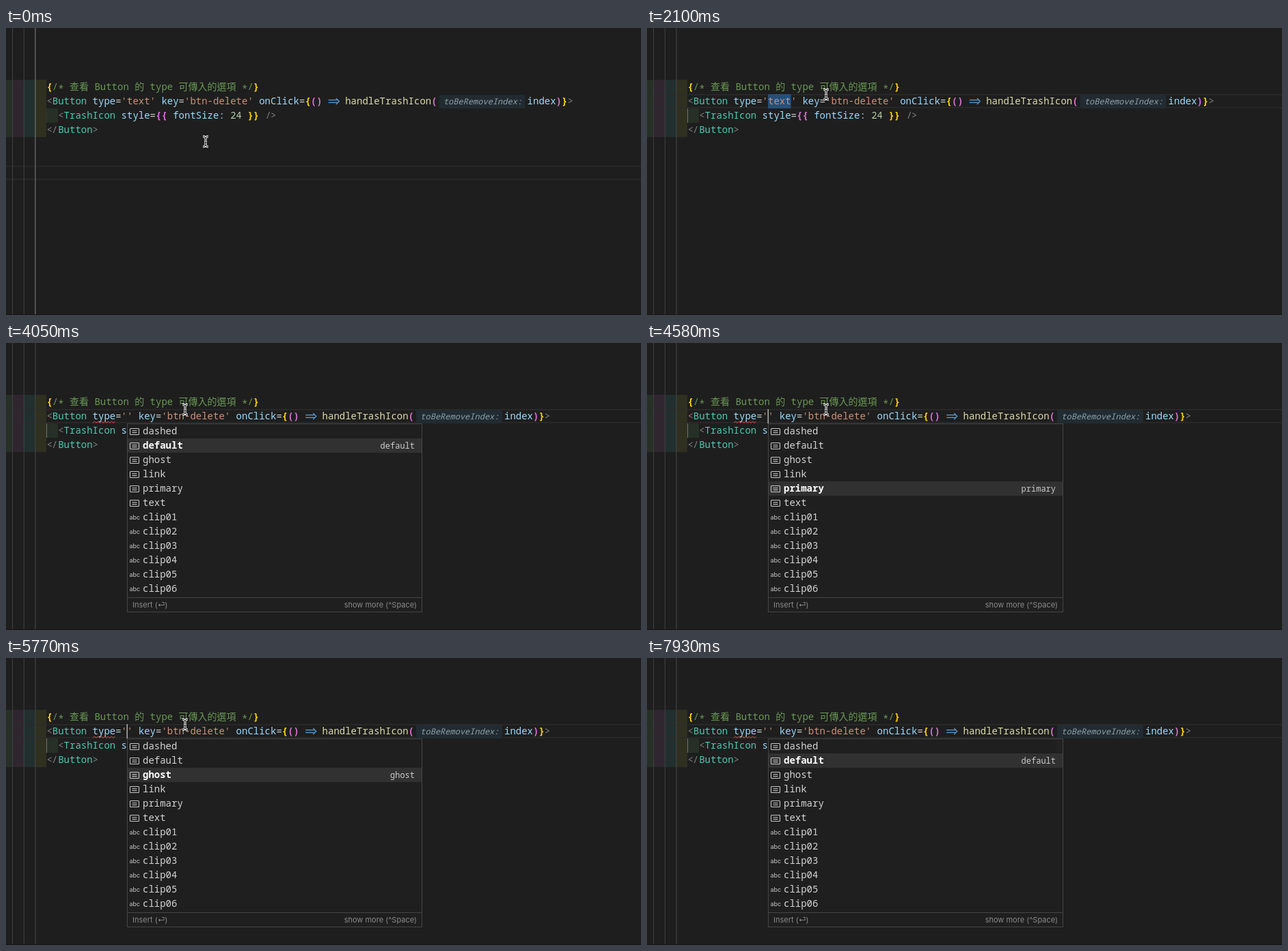
An HTML page with a canvas that plays this animation: 929x421 px, repeating every 8120 ms.

```html
<!DOCTYPE html>
<html lang="zh-Hant">
<head>
<meta charset="utf-8">
<style>
  html, body { margin: 0; width: 100%; height: 100%; overflow: hidden; background: #1e1e1e; }
  canvas { display: block; }
</style>
</head>
<body>
<canvas id="stage" width="929" height="421"></canvas>
<script>
const ctx = document.getElementById('stage').getContext('2d');
const LOOP = 8120, W = 929, H = 421;
const LEFT = 59.4, CHAR = 8.4, ROW = 21, TOP = 76, INDENT = 2 * CHAR;
const MONO = '"Noto Sans Mono", "Noto Sans CJK TC", "Noto Sans CJK JP", monospace';
const SANS = 'Inter, "DejaVu Sans", sans-serif';
const C = {
  bg: '#1e1e1e', tag: '#808080', type: '#4ec9b0', attr: '#9cdcfe', string: '#ce9178',
  number: '#b5cea8', call: '#dcdcaa', comment: '#6a9955', arrow: '#569cd6',
  gold: '#ffd700', pink: '#da70d6', plain: '#d4d4d4', guide: '#404040', active: '#707070'
};
const bands = ['127,255,127', '255,127,255', '79,236,236', '255,255,64'].map(c => `rgba(${c},.08)`);

const CLICK = 1410, SELECT = 1540, ERASE = 2450, SQUIGGLE = 3070, POPUP = 3280, LEAVE = 7400;
const items = ['dashed', 'default', 'ghost', 'link', 'primary', 'text',
  ...Array.from({ length: 6 }, (_, i) => 'clip0' + (i + 1))];
// [time, focused row]
const focusSteps = [[POPUP, 0], [4050, 1], [4230, 2], [4400, 3], [4520, 4], [5050, 5],
  [5410, 4], [5650, 3], [5770, 2], [5950, 1]];
// [time, caret shown]
const caretSteps = [[0, 0], [CLICK, 1], [2100, 0], [2510, 1], [3020, 0], [3460, 1], [3990, 0],
  [4460, 1], [4960, 0], [5470, 1], [6010, 0], [6470, 1], [6990, 0], [7400, 1], [7930, 0]];
// [time, x, y]
const pointerPath = [[0, 292, 166.5], [470, 292, 166.5], [1230, 195, 111], [1560, 195, 111],
  [1800, 262, 97.5], [6250, 262, 97.5], [6300, 268, 84], [6420, 261, 236], [6480, 259, 259],
  [6700, 262, 260], [7050, 280, 215], [7230, 280, 215], [7360, 689, 393], [LOOP, 689, 393]];

const clamp = v => Math.max(0, Math.min(1, v));
const valueAt = (steps, t) => steps.filter(s => s[0] <= t).pop()[1];

function pointerAt(t) {
  const i = pointerPath.findIndex(k => k[0] > t);
  const [t0, x0, y0] = pointerPath[i - 1], [t1, x1, y1] = pointerPath[i];
  const p = (t - t0) / (t1 - t0), e = p * p * (3 - 2 * p);
  return { x: x0 + (x1 - x0) * e, y: y0 + (y1 - y0) * e };
}

function rect(color, x, y, w, h) {
  ctx.fillStyle = color;
  ctx.fillRect(x, y, w, h);
}

function roundRect(x, y, w, h, r) {
  ctx.beginPath();
  ctx.roundRect(x, y, w, h, r);
}

function text(str, x, y, color, font, align = 'left') {
  ctx.font = font;
  ctx.fillStyle = color;
  ctx.textAlign = align;
  ctx.fillText(str, x, y);
}

function stroke(points, color, width) {
  ctx.beginPath();
  points.forEach(([x, y]) => ctx.lineTo(x, y));
  ctx.strokeStyle = color;
  ctx.lineWidth = width;
  ctx.stroke();
}

// Draws [color, text, shiftX, shiftY] parts one after another and returns the end position.
function run(x, y, parts) {
  for (const [color, str, dx = 0, dy = 0] of parts) {
    const weight = color === C.gold || color === C.pink ? 700 : 500;
    text(str, x + dx, y + dy, color, `${weight} 14px ${MONO}`);
    x += ctx.measureText(str).width;
  }
  return x;
}

function doubleArrow(x, y) {
  for (const dy of [-1.9, 1.9]) stroke([[x, y + dy], [x + 13.5, y + dy]], C.arrow, 1.3);
  stroke([[x + 11, y - 4.6], [x + 15.6, y], [x + 11, y + 4.6]], C.arrow, 1.3);
}

function drawCode(t) {
  const base = row => TOP + row * ROW + 15;
  run(LEFT, base(0), [
    [C.gold, '{'], [C.comment, '/'], [C.comment, '*', 0, 3],
    [C.comment, ' 查看 Button 的 type 可傳入的選項 '],
    [C.comment, '*', 0, 3], [C.comment, '/'], [C.gold, '}']
  ]);

  let x = run(LEFT, base(1), [
    [C.tag, '<'], [C.type, 'Button '], [C.attr, 'type'], [C.plain, '='],
    [C.string, t < ERASE ? "'text' " : "'' "], [C.attr, 'key'], [C.plain, '='],
    [C.string, "'btn-delete' "], [C.attr, 'onClick'], [C.plain, '='], [C.gold, '{'], [C.pink, '() ']
  ]);
  doubleArrow(x + 0.8, 107.5);
  x = run(x + 3 * CHAR, base(1), [[C.call, 'handleTrashIcon'], [C.pink, '(']]);
  ctx.fillStyle = '#212b31';
  roundRect(x + 3, 98, 126, 20, 3);
  ctx.fill();
  text('toBeRemoveIndex:', x + 9.3, base(1), '#8f a1ab'.replace(' ', ''), `italic 500 12px ${MONO}`);
  run(x + 132, base(1), [[C.attr, 'index'], [C.pink, ')'], [C.gold, '}'], [C.tag, '>']]);

  run(LEFT + INDENT, base(2), [
    [C.tag, '<'], [C.type, 'TrashIcon '], [C.attr, 'style'], [C.plain, '='], [C.pink, '{{ '],
    [C.attr, 'fontSize: '], [C.number, '24 '], [C.gold, '}} '], [C.tag, '/', 1], [C.tag, '>']
  ]);
  run(LEFT, base(3), [[C.tag, '<'], [C.tag, '/', -0.8], [C.type, 'Button'], [C.tag, '>']]);
}

function drawEditor(t) {
  const clicked = t >= CLICK;
  rect(C.bg, 0, 0, W, H);

  const edges = [0, 9, 26, 43, 59];
  bands.forEach((color, i) => rect(color, edges[i], TOP, edges[i + 1] - edges[i], 4 * ROW));
  rect(bands[0], 59, 118, 17, ROW);

  const lineTop = TOP + (clicked ? 1 : 6) * ROW;
  for (const y of [lineTop, lineTop + 19]) rect('#2b2b2b', 0, y, W, 1.5);

  rect(C.guide, 9, 0, 1, H);
  rect(C.guide, 25.8, 0, 1, H);
  rect(clicked ? C.guide : C.active, 42.3, 0, 1.2, H);
  rect(clicked ? C.active : '#303630', 59, 118, 1, ROW);
  rect('#141414', 0, 420, W, 1);

  if (t >= SELECT && t < ERASE) rect('#264f78', LEFT + 14 * CHAR, 97, 4 * CHAR, ROW);
  drawCode(t);

  if (t >= SQUIGGLE) {
    const wave = Array.from({ length: 14 }, (_, i) => [127 + i * 2.5, i % 2 ? 115 : 117.3]);
    stroke(wave, '#f14c4c', 1);
  }
  if (valueAt(caretSteps, t)) {
    const column = t < SELECT ? 16 : t < ERASE ? 18 : 14;
    rect('#aeafad', Math.floor(LEFT + column * CHAR) - 0.5, 97, 1.5, ROW);
  }
}

function memberIcon(y) {
  ctx.strokeStyle = '#c5c5c5';
  ctx.lineWidth = 1.1;
  roundRect(181.5, y + 6.5, 13, 9, 1);
  ctx.stroke();
  for (const dy of [9.2, 12]) rect('#c5c5c5', 184.5, y + dy, 7, 1.1);
}

const overPopup = ({ x, y }) => x > 177 && x < 609 && y > 118 && y < 395;

function drawPopup(t) {
  rect('#454545', 177, 118, 432, 277);
  rect('#1f1f1f', 178, 119, 430, 275);
  const focus = valueAt(focusSteps, t);
  const lagged = pointerAt(t - 60);
  const hover = t < LEAVE && overPopup(lagged) ? Math.floor((lagged.y - 119) / ROW) : -1;

  items.forEach((label, i) => {
    const y = 119 + i * ROW, focused = i === focus;
    if (focused) rect('#313132', 178, y, 430, ROW);
    else if (i === hover) rect('#2a2d2e', 178, y, 430, ROW);
    if (i < 6) memberIcon(y);
    else text('abc', 180.5, y + 14, '#c5c5c5', `9px ${SANS}`);
    text(label, 200, y + 15, focused ? '#ffffff' : C.plain, `${focused ? 600 : 500} 14px ${MONO}`);
    if (focused) text(label, 598, y + 15, '#cccccc', `12px ${MONO}`, 'right');
  });

  ctx.globalAlpha = clamp((t - 6330) / 100) * clamp(1 - (t - LEAVE) / 590);
  rect('#3a3a3b', 598, 119, 10, 20);
  ctx.globalAlpha = 1;

  rect('#454545', 178, 373, 430, 1);
  text('Insert (⏎)', 185, 388, '#8a8a8a', `11px ${SANS}`);
  text('show more (^Space)', 601, 388, '#8a8a8a', `11px ${SANS}`, 'right');
}

const beam = new Path2D('M-4 -7.5 Q0 -7.5 0 -4.5 Q0 -7.5 4 -7.5 M0 -5 V5 M-4 7.5 Q0 7.5 0 4.5 Q0 7.5 4 7.5 M-2 2 H2');
const hand = new Path2D('M-3.8 -6.2 Q-2.4 -8.2 -1 -6.2 L.2 -2.4 Q1.6 -3.6 2.6 -2 Q4.2 -2.6 4.8 -1 Q6.7 -1 6.6 1 L6 4.5 L4.8 7.5 H-1.2 L-5.6 1.6 Q-6 -.6 -4 0 L-2.2 1.2 Z');
const knuckles = new Path2D('M0 2.5 V5.5 M2 2.5 V5.5 M4 2.5 V5.5');

function drawPointer(t) {
  if (t >= LEAVE) return;
  const pos = pointerAt(t);
  const outline = (path, color, width) => {
    ctx.strokeStyle = color;
    ctx.lineWidth = width;
    ctx.stroke(path);
  };
  ctx.save();
  ctx.translate(pos.x, pos.y);
  ctx.lineJoin = 'round';
  if (t >= POPUP && overPopup(pos)) {
    outline(hand, '#000', 2);
    ctx.fillStyle = '#fff';
    ctx.fill(hand);
    outline(knuckles, '#000', 0.8);
  } else {
    outline(beam, '#fff', 3);
    outline(beam, '#000', 0.9);
  }
  ctx.restore();
}

function frame(now) {
  const t = now % LOOP;
  drawEditor(t);
  if (t >= POPUP) drawPopup(t);
  drawPointer(t);
  requestAnimationFrame(frame);
}
requestAnimationFrame(frame);
</script>
</body>
</html>
```
